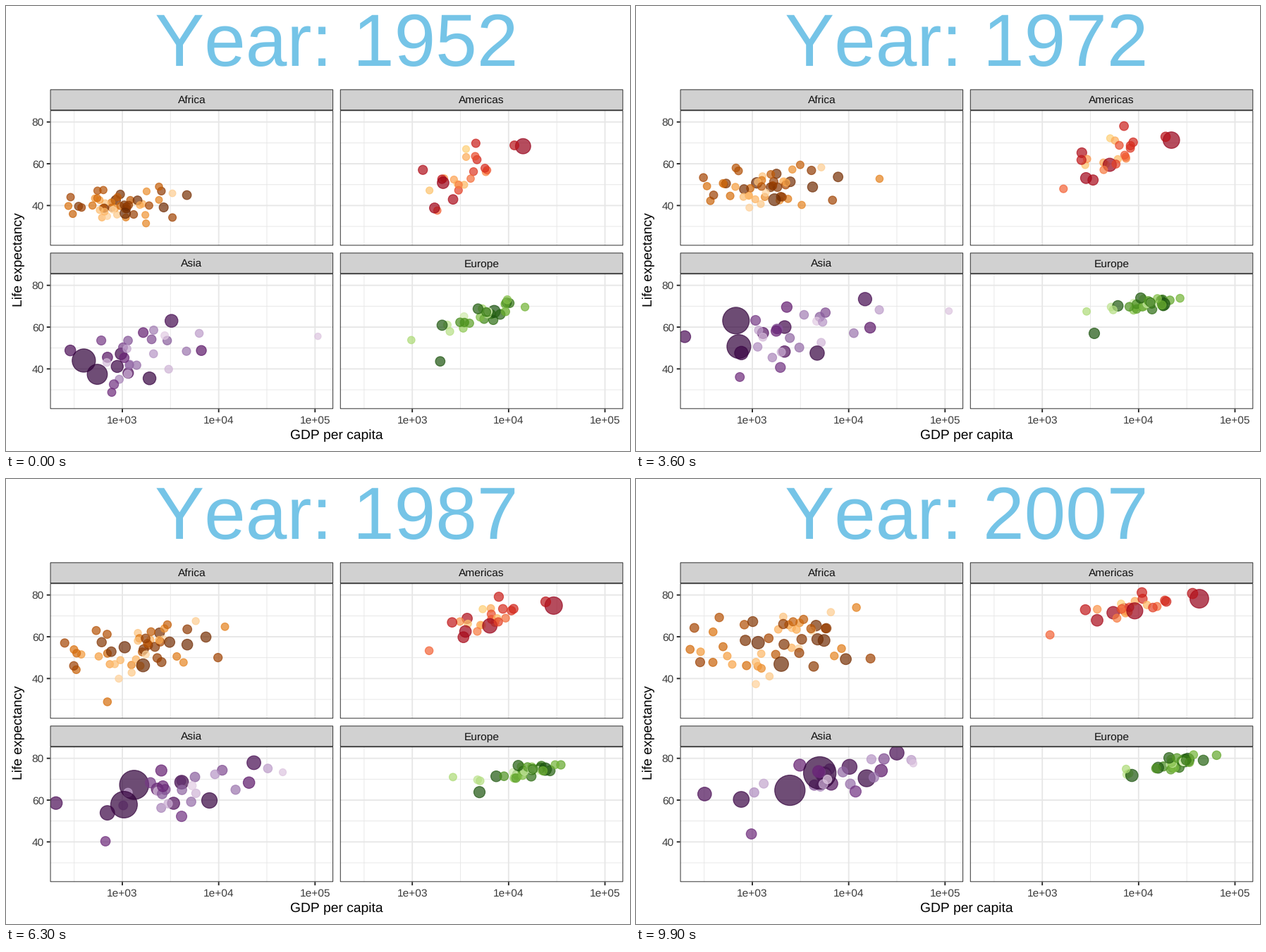
Animation, 885 px wide and 632 px high, one loop 10000 ms. Source, as a matplotlib script:

```python
import numpy as np
import matplotlib.pyplot as plt
from matplotlib.animation import FuncAnimation
from matplotlib.colors import LinearSegmentedColormap, to_rgb
from matplotlib.patches import Rectangle

W, H, DPI = 885, 632, 64
PX = 72 / DPI              # points per pixel
UNIT = 126.4 / 72          # pixels per typographic point of the layout
FRAMES = 100
YEARS = np.linspace(1952, 2007, FRAMES)
KEYS = (1952, 1972, 1992, 2007)
T = np.linspace(0, 1, FRAMES)[:, None]

PW, PH, STRIP = 401.5, 192.1, 29.8
THICK, THIN = 1.87, 0.93

plt.rcParams.update({"font.family": "Liberation Sans", "text.hinting": "none",
                     "text.kerning_factor": 6})


def tone(color):
    """Slightly darker display gamma."""
    return tuple(np.array(to_rgb(color)) ** 1.222)


def ramp(stops, n):
    """Dark to light by population rank."""
    rgb = LinearSegmentedColormap.from_list("ramp", stops)(np.linspace(0, 1, n) ** 1.2)
    rgb[:, :3] **= 1.222
    return rgb


def keyed(values):
    return np.interp(YEARS, KEYS, values)[:, None]


def cloud(rng, n, mx, sx, my, sy, corr):
    """A correlated swarm whose centre and spread follow key values."""
    z = np.clip(rng.normal(size=(4, n)), -2, 2)
    turn = 0.8 * T
    u = z[0] * np.cos(turn) + z[1] * np.sin(turn)
    v = z[2] * np.cos(turn) + z[3] * np.sin(turn)
    c = keyed(corr)
    x = keyed(mx) + keyed(sx) * u
    y = keyed(my) + keyed(sy) * (c * u + np.sqrt(1 - c ** 2) * v)
    return x, y


def diameter(pop):
    size = 2 + 10 * np.sqrt(pop / 1319)
    return 0.75 * (size * 2.845 + 0.945) * UNIT


fig = plt.figure(figsize=(W / DPI, H / DPI), dpi=DPI, facecolor="white")
ax = fig.add_axes([0, 0, 1, 1])
ax.set(xlim=(0, W), ylim=(H, 0))
ax.axis("off")
INK, MAJOR = tone("#333333"), tone("#EBEBEB")


def line(x, y, width, color):
    ax.plot(x, y, color=color, lw=width * PX, solid_capstyle="butt", zorder=1, snap=False)


def label(x, y, s, pt, color, ha="center", **kw):
    return ax.text(x, y, s, fontsize=pt * UNIT * PX, color=tone(color), ha=ha,
                   va="baseline", zorder=5, **kw)


def frame(x, y, h, fill="none"):
    ax.add_patch(Rectangle((x + THIN / 2, y + THIN / 2), PW - THIN, h - THIN, fc=fill,
                           ec=INK, lw=THIN * PX, zorder=4, snap=False))


class Panel:
    def __init__(self, name, col, row, n, seed, stops, swarm, people, leads):
        """people: top population, decay by rank, share at the start.
        leads: rank -> (start and end population, log income keys, life keys)."""
        self.x, self.y = 62.6 + 411.2 * col, 148.2 + 232 * row
        rng = np.random.default_rng(seed)
        gdp, life = cloud(rng, n, *swarm)
        top, decay, share = people
        now = top * np.exp(-decay * np.sqrt(np.arange(n)))
        then = now * share
        for rank, (pop, gx, ly) in leads.items():
            then[rank], now[rank] = pop
            gdp[:, [rank]], life[:, [rank]] = keyed(gx), keyed(ly)
        size = diameter(then) + (diameter(now) - diameter(then)) * T

        order = rng.permutation(n)
        self.px = self.to_x(gdp)[:, order]
        self.py = self.to_y(life)[:, order]
        self.area = (size[:, order] * PX) ** 2

        self.grid(col, row)
        frame(self.x, self.y - STRIP, STRIP, tone("#D9D9D9"))
        frame(self.x, self.y, PH)
        label(self.x + PW / 2, self.y - 9.4, name, 8.8, "#1A1A1A")
        self.dots = ax.scatter(self.px[0], self.py[0], s=self.area[0], alpha=0.7,
                               c=ramp(stops, n)[order], linewidths=1.24 * PX, zorder=3)
        box = Rectangle((self.x, self.y), PW, PH, fc="none", ec="none")
        ax.add_patch(box)
        self.dots.set_clip_path(box)

    def to_x(self, log_gdp):
        return self.x + 102.4 + 136.65 * (log_gdp - 3)

    def to_y(self, life):
        return self.y + 16.5 + 2.967 * (80 - life)

    def grid(self, col, row):
        right, bottom = self.x + PW, self.y + PH
        for g in (2.5, 3.5, 4.5):
            line([self.to_x(g)] * 2, [self.y, bottom], THIN, MAJOR)
        for v in (30, 50, 70):
            line([self.x, right], [self.to_y(v)] * 2, THIN, MAJOR)
        for g in (3, 4, 5):
            x = self.to_x(g)
            line([x, x], [self.y, bottom], THICK, MAJOR)
            if row:
                line([x, x], [bottom, bottom + 4.83], THICK, INK)
                label(x, 592.8, f"1e+0{g}", 8.8, "#4D4D4D")
        for v in (40, 60, 80):
            y = self.to_y(v)
            line([self.x, right], [y, y], THICK, MAJOR)
            if not col:
                line([self.x - 4.83, self.x], [y, y], THICK, INK)
                label(54, y + 5.5, str(v), 8.8, "#4D4D4D", ha="right")

    def show(self, i):
        self.dots.set_offsets(np.column_stack([self.px[i], self.py[i]]))
        self.dots.set_sizes(self.area[i])


panels = [
    Panel("Africa", 0, 0, 52, 4, ["#7F3B08", "#B35806", "#E08214", "#FDB863", "#FEE0B6"],
          swarm=[(2.98, 3.13, 3.15, 3.23), (.27, .31, .38, .44),
                 (39.2, 47.5, 54, 55), (4.8, 6, 8, 9), (.3, .4, .6, .45)],
          people=(135, .56, .26),
          leads={0: ((33, 135), (3.03, 3.23, 3.21, 3.30), (36.3, 42.8, 47.5, 46.9)),
                 4: ((14, 44), (3.67, 3.89, 3.86, 3.97), (45, 53.7, 61.9, 49.3)),
                 28: ((2.5, 9), (2.69, 2.77, 2.87, 2.94), (40, 44.6, 23.6, 46.2)),
                 32: ((1, 6), (3.38, 4.32, 3.98, 4.08), (42.7, 52.8, 68.8, 74))}),
    Panel("Americas", 1, 0, 25, 8, ["#A50026", "#D73027", "#F46D43", "#FDAE61", "#FEE090"],
          swarm=[(3.49, 3.69, 3.78, 3.91), (.19, .19, .19, .22),
                 (52.5, 62.5, 69.8, 73.8), (8, 6.5, 4, 3.2), (.55, .5, .5, .45)],
          people=(301, .95, .38),
          leads={0: ((158, 301), (4.15, 4.34, 4.51, 4.63), (68.4, 71.3, 76.1, 78.2)),
                 1: ((57, 190), (3.32, 3.70, 3.84, 3.96), (50.9, 59.5, 67.1, 72.4)),
                 5: ((15, 33), (4.06, 4.28, 4.42, 4.56), (68.8, 72.9, 78, 80.7)),
                 14: ((3, 8.5), (3.26, 3.22, 3.16, 3.08), (37.6, 48, 55.1, 60.9))}),
    Panel("Asia", 0, 1, 33, 3, ["#40004B", "#762A83", "#9970AB", "#C2A5CF", "#E7D4E8"],
          swarm=[(3.14, 3.4, 3.62, 3.8), (.34, .46, .5, .5),
                 (47, 57, 67, 71), (8, 8.5, 7, 6), (.55, .6, .75, .8)],
          people=(600, .7, .38),
          leads={0: ((556, 1319), (2.60, 2.83, 3.22, 3.70), (44, 63.1, 68.7, 73)),
                 1: ((372, 1110), (2.74, 2.86, 3.07, 3.39), (37.4, 50.7, 60.2, 64.7)),
                 5: ((86, 127), (3.51, 4.17, 4.43, 4.50), (63, 73.4, 79.4, 82.6)),
                 12: ((8, 32), (2.89, 2.87, 2.81, 2.99), (28.8, 36.1, 41.7, 43.8)),
                 31: ((.2, 2.5), (5.03, 5.04, 4.54, 4.67), (55.6, 67.7, 75.2, 77.6))}),
    Panel("Europe", 1, 1, 30, 6, ["#276419", "#4D9221", "#7FBC41", "#B8E186", "#E6F5D0"],
          swarm=[(3.71, 4.05, 4.17, 4.36), (.2, .16, .22, .21),
                 (65.8, 71.3, 74.7, 77.8), (3.9, 1.8, 2.6, 2.7), (.8, .5, .85, .85)],
          people=(100, .55, .72),
          leads={0: ((69, 82), (3.85, 4.26, 4.42, 4.51), (67.5, 71, 76.1, 79.4)),
                 1: ((22, 71), (3.29, 3.54, 3.75, 3.93), (43.6, 57, 66.1, 71.8)),
                 17: ((5, 7.6), (4.17, 4.43, 4.50, 4.57), (69.6, 73.8, 78, 81.7)),
                 23: ((2.8, 4.5), (2.99, 3.46, 3.41, 3.87), (53.8, 67.5, 72.2, 74.9))})]

label(468.9, 614.8, "GDP per capita", 11, "black")
label(23.4, 360.5, "Life expectancy", 11, "black", rotation=90, rotation_mode="anchor")
title = label(211.2, 84.6, "", 60, "#87CEEB", ha="left")


def update(i):
    title.set_text(f"Year: {round(YEARS[i])}")
    for p in panels:
        p.show(i)
    return [title]


anim = FuncAnimation(fig, update, frames=FRAMES, interval=100, repeat=True,
                     repeat_delay=0, blit=False)
plt.show()
```
